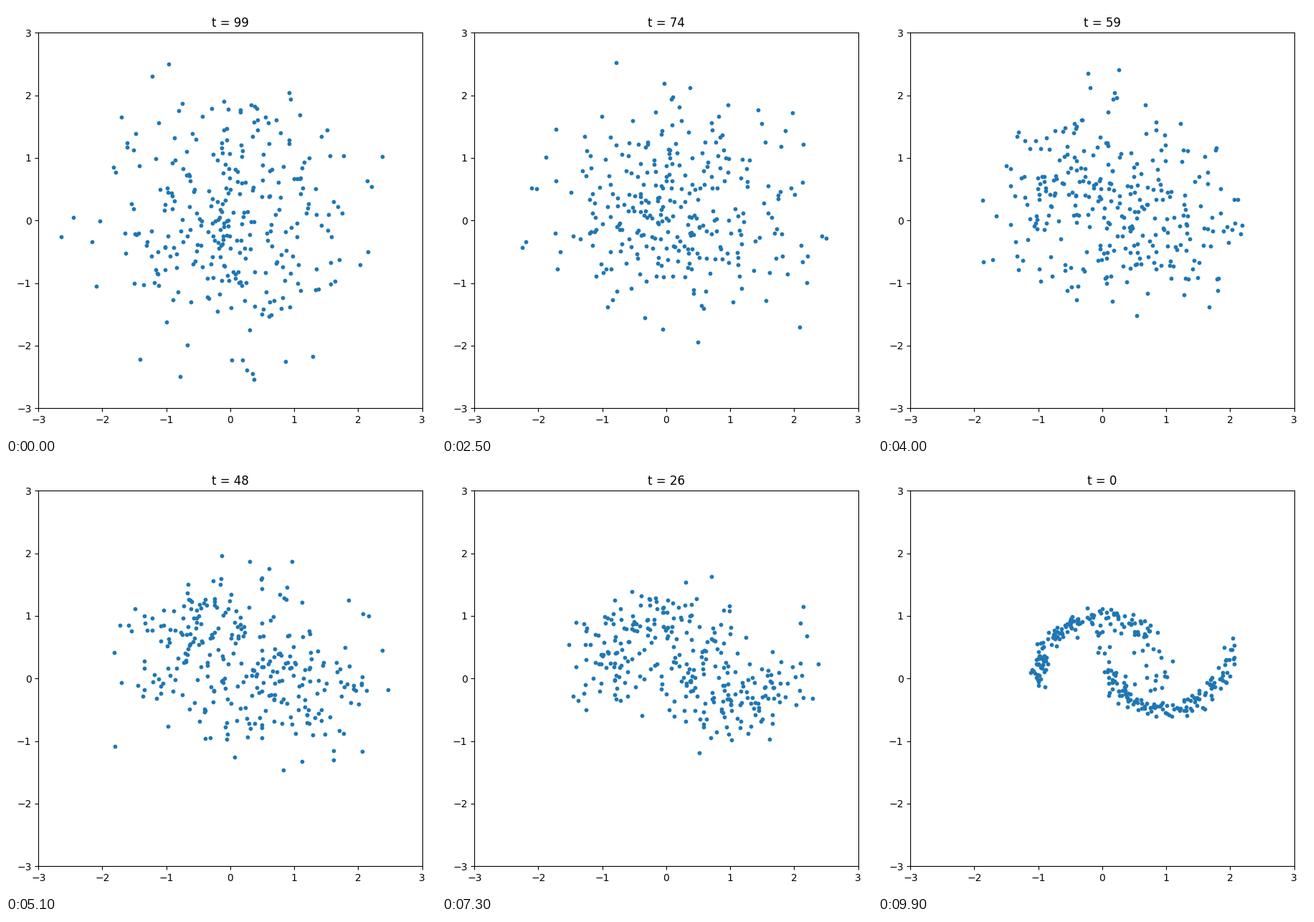
Recreate the animation shown at these times as a matplotlib script. Size 600x600 px, loop 10000 ms.

```python
import numpy as np
import matplotlib.pyplot as plt
from matplotlib.animation import FuncAnimation

STEPS = 100
POINTS = 300
SPREAD = 0.06
JITTER = 1.06
rng = np.random.default_rng(4)


def start_cloud():
    cloud = rng.normal(size=(2 * POINTS, 2))
    return cloud[np.hypot(*cloud.T) < 2.7][:POINTS]


def ramp(a, start):
    """Weight rising from thin to full cover around the angle start."""
    return 0.2 + 0.8 / (1 + np.exp((start - a) / 0.1))


def two_moons(n=70, stray=50):
    """Centres and weights of two arcs with a thin haze between them."""
    a = np.linspace(0, np.pi, n)
    upper = np.column_stack([np.cos(a), np.sin(a)])
    lower = np.column_stack([1 - np.cos(a), 0.5 - np.sin(a)])
    x = rng.uniform(-0.4, 1.05, stray)
    top = np.sqrt(1 - np.minimum(x ** 2, 0.95))
    low = 0.5 - np.sqrt(np.clip(1 - (1 - x) ** 2, 0, 1))
    haze = np.column_stack([x, rng.uniform(low, top)])
    weights = np.concatenate([1.35 * ramp(a, 0.85), ramp(a, 0.45),
                              np.full(stray, 0.3 * n / stray)])
    return np.vstack([upper, lower, haze]), weights


def denoise():
    """Reverse diffusion from the start cloud down to the moons."""
    beta = np.linspace(1e-4, 0.02, STEPS)
    kept = np.cumprod(1 - beta)
    centres, weights = two_moons()
    x = start_cloud()
    path = [x]
    for t in range(STEPS - 2, -1, -1):
        scale = np.sqrt(kept[t])
        var = kept[t] * SPREAD ** 2 + 1 - kept[t]
        gap = x[:, None] - scale * centres
        logp = np.log(weights) - (gap ** 2).sum(axis=2) / (2 * var)
        p = np.exp(logp - logp.max(axis=1, keepdims=True))
        p /= p.sum(axis=1, keepdims=True)
        x = (x - beta[t] * (x - scale * p @ centres) / var) / np.sqrt(1 - beta[t])
        if t > 0:
            x = x + JITTER * np.sqrt(beta[t]) * rng.normal(size=x.shape)
        path.append(x)
    return path


path = denoise()

fig, ax = plt.subplots(figsize=(6, 6), dpi=100)
ax.set_xlim(-3, 3)
ax.set_ylim(-3, 3)
dots = ax.scatter(*path[0].T, s=10)
title = ax.set_title(f"t = {STEPS - 1}")
fig.tight_layout()


def update(i):
    dots.set_offsets(path[i])
    title.set_text(f"t = {STEPS - 1 - i}")
    return dots, title


anim = FuncAnimation(fig, update, frames=STEPS, interval=100,
                     repeat=True, repeat_delay=0, blit=False)
plt.show()
```
